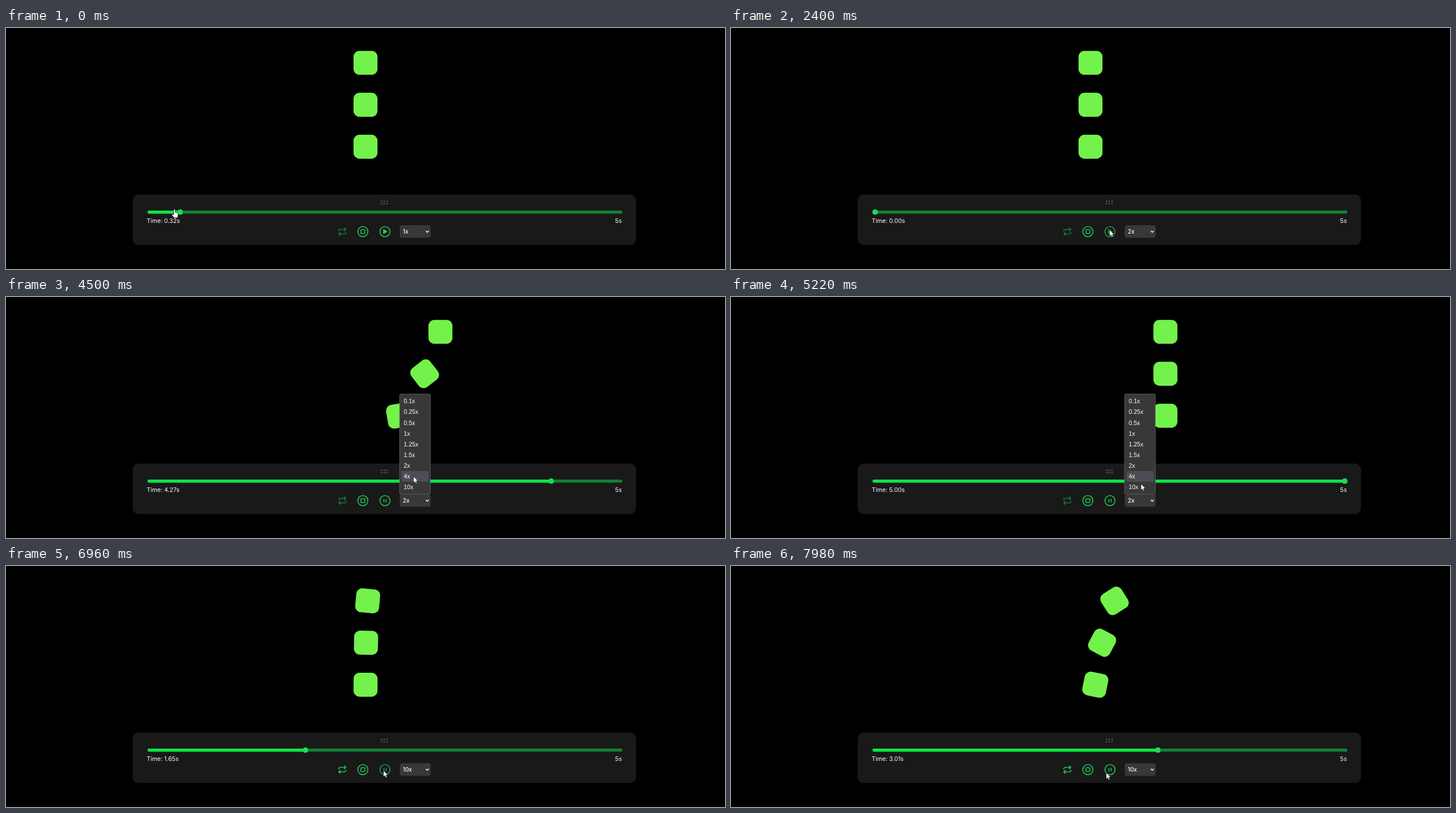
Recreate the animation shown at these times as an HTML page. Size 1280 px wide and 429 px high, loop 8000 ms.

```html
<!DOCTYPE html>
<html lang="en">
<head>
<meta charset="utf-8">
<title>Animation timeline controls</title>
<style>
  html, body { margin: 0; width: 100%; height: 100%; overflow: hidden; background: #000; }
  svg { display: block; width: 100%; height: 100%; }
  text { fill: #fff; font: 10.67px Inter, sans-serif; }
  #speed { font-size: 10px; font-weight: 500; }
  #menu text { font: 10.67px "Liberation Sans", Arial, sans-serif; }
  .icon { fill: none; stroke: #1fc954; stroke-width: 1.6; stroke-linecap: round; stroke-linejoin: round; }
  .solid { fill: #1fdc59; stroke: #1fdc59; stroke-width: 1; }
  .cursor { fill: #fff; stroke: #111; stroke-width: .7; stroke-linejoin: round; }
</style>
</head>
<body>
<svg viewBox="0 0 1280 429">
  <rect width="1280" height="429"/>
  <g id="squares" fill="#73f24b"></g>

  <rect x="225.5" y="296.5" width="896" height="89.8" rx="10.67" fill="#191919"/>
  <g id="grip" fill="#5c5c5c"></g>

  <rect x="252" y="325" width="845.3" height="5.4" rx="2.4" fill="#138032"/>
  <rect id="fill" x="252" y="325" height="5.4" rx="2.4" fill="#0be548"/>
  <circle id="thumb" cy="327.7" r="4.9" fill="#1fd955"/>
  <text id="time" x="250.5" y="346.5"></text>
  <text x="1096.3" y="346.5" text-anchor="end">5s</text>

  <g id="loop" class="icon" stroke-width="1.5">
    <path d="M592.4 361.6v-.6a2.5 2.5 0 0 1 2.5-2.5H605m-2.6-2.6 2.6 2.6-2.6 2.6"/>
    <path d="M605 363.4v.6a2.5 2.5 0 0 1-2.5 2.5H592.4m2.6 2.6-2.6-2.6 2.6-2.6"/>
  </g>
  <g id="stop" class="icon">
    <circle cx="635.3" cy="362.5" r="9"/>
    <rect x="631.8" y="359" width="7" height="7" rx="1"/>
  </g>
  <g id="toggle" class="icon">
    <circle cx="674.7" cy="362.5" r="9"/>
    <path id="play" class="solid" d="M672 358.7V366.3L678.3 362.5Z"/>
    <path id="pause" d="M672.8 360v5M676.7 360v5"/>
  </g>

  <rect x="701" y="351" width="55" height="22.5" rx="4" fill="#383838"/>
  <text id="speed" x="706.5" y="366"></text>
  <path d="M747.4 361.1 750 363.7 752.6 361.1" fill="none" stroke="#fff" stroke-width="1.4"/>

  <g id="menu">
    <rect x="700.8" y="172.8" width="54.6" height="178" rx="2" fill="#383838" stroke="#6c6c6c" stroke-width=".8"/>
    <rect id="hover" x="704" width="48.3" height="19.1" fill="#4d4d55"/>
  </g>

  <path id="arrow" class="cursor" d="M0 0V11.3L2.6 8.9 4.3 12.7 6.3 11.8 4.6 8.1H8.1Z"/>
  <path id="hand" class="cursor" d="M-1.4 1.2a1.4 1.4 0 0 1 2.8 0V5.2l4 .9q1.6.5 1.5 2L6.2 12 5.4 15H-.7L-4.5 9.9q-.4-1.5 1.1-1.5l2 1.2Z"/>
</svg>
<script>
const LOOP = 8000, STEP = 60, ROW = 19.1, MENU_TOP = 176;
const SPEEDS = ['0.1x', '0.25x', '0.5x', '1x', '1.25x', '1.5x', '2x', '4x', '10x'];
const $ = id => document.getElementById(id);

function add(parent, tag, attrs, text = '') {
  const el = document.createElementNS('http://www.w3.org/2000/svg', tag);
  for (const key in attrs) el.setAttribute(key, attrs[key]);
  el.textContent = text;
  return parent.appendChild(el);
}

const show = (id, on) => { $(id).style.display = on ? '' : 'none'; };
const clamp = (v, lo, hi) => Math.min(hi, Math.max(lo, v));
const smooth = p => p * p * (3 - 2 * p);

const squares = [0, 1, 2].map(() =>
  add($('squares'), 'rect', { x: -21.33, y: -21.33, width: 42.67, height: 42.67, rx: 10.67 }));
for (let i = 0; i < 6; i++)
  add($('grip'), 'circle', { cx: 668.5 + (i % 3) * 4.9, cy: i < 3 ? 308.5 : 312.7, r: 1.3 });
SPEEDS.forEach((label, i) =>
  add($('menu'), 'text', { x: 708, y: 189.3 + i * ROW }, label));

// Pointer stops: time, x, y
const STOPS = [
  [0, 299.8, 323], [330, 250, 324], [420, 250, 324], [820, 724, 363], [980, 724, 363],
  [1400, 722, 301], [1640, 722, 301], [2260, 674, 359.5], [2700, 674, 359.5],
  [3340, 728, 364], [3460, 728, 364], [3600, 733, 338], [3840, 732, 322.5],
  [4500, 725.5, 319.5], [4950, 725.5, 319.5], [5250, 730, 333], [6060, 730, 333],
  [6300, 598, 363], [6380, 598, 363], [6540, 635, 363], [6640, 635, 363],
  [6780, 672, 364], [6960, 672, 364], [7200, 668, 368], [LOOP, 668, 368]
];

function pointer(t) {
  const i = Math.max(1, STOPS.findIndex(s => s[0] >= t));
  const [a, b] = [STOPS[i - 1], STOPS[i]];
  const p = smooth(clamp((t - a[0]) / (b[0] - a[0]), 0, 1));
  return [a[1] + (b[1] - a[1]) * p, a[2] + (b[2] - a[2]) * p];
}

// Scrub to zero, play at 2x, stop, then repeat at 10x
function playhead(t) {
  if (t < 2520) return 0.32 * (1 - smooth(clamp(t / 360, 0, 1)));
  if (t < 6600) return clamp(2.84 + (t - 3840) * 0.002167, 0, 5);
  if (t < 6810) return 0;
  return (11.33 + (t - 7380) * 0.0111333) % 5;
}

function render(t) {
  const time = playhead(t);
  squares.forEach((el, i) => {
    const p = clamp((time - i * 0.5) / 4, 0, 1) ** 4;
    el.setAttribute('transform',
      `translate(${640 + 133.4 * p} ${62 + 74.67 * i}) rotate(${180 * p})`);
  });

  const thumbX = 256.6 + time / 5 * 836;
  $('thumb').setAttribute('cx', thumbX);
  $('fill').setAttribute('width', thumbX - 252);
  $('time').textContent = `Time: ${time.toFixed(2)}s`;

  const playing = (t >= 2520 && t < 6600) || t >= 6810;
  show('play', !playing);
  show('pause', playing);

  const speed = t < 1500 ? '1x' : t < 5520 ? '2x' : '10x';
  $('speed').textContent = speed;

  const [x, y] = pointer(t);
  const open = (t >= 920 && t < 1500) || (t >= 3460 && t < 5520);
  show('menu', open);
  const row = Math.floor((pointer(t - 120)[1] - MENU_TOP) / ROW);
  const active = SPEEDS[row] ? row : SPEEDS.indexOf(speed);
  $('hover').setAttribute('y', MENU_TOP + active * ROW);

  const near = cx => Math.hypot(x - cx, y - 362.5) < 8;
  $('stop').style.opacity = near(635.3) ? 0.75 : 1;
  $('toggle').style.opacity = near(674.7) ? 0.75 : 1;
  $('loop').style.opacity = t >= 6330 ? 1 : 0.55;

  const onTrack = !open && Math.abs(y - 327.5) < 5;
  show('hand', onTrack);
  show('arrow', !onTrack);
  $(onTrack ? 'hand' : 'arrow').setAttribute('transform', `translate(${x} ${y})`);
}

let start;
function tick(now) {
  start ??= now;
  const t = (now - start) % LOOP;
  render(Math.floor(t / STEP) * STEP);
  requestAnimationFrame(tick);
}
render(0);
requestAnimationFrame(tick);
</script>
</body>
</html>
```
